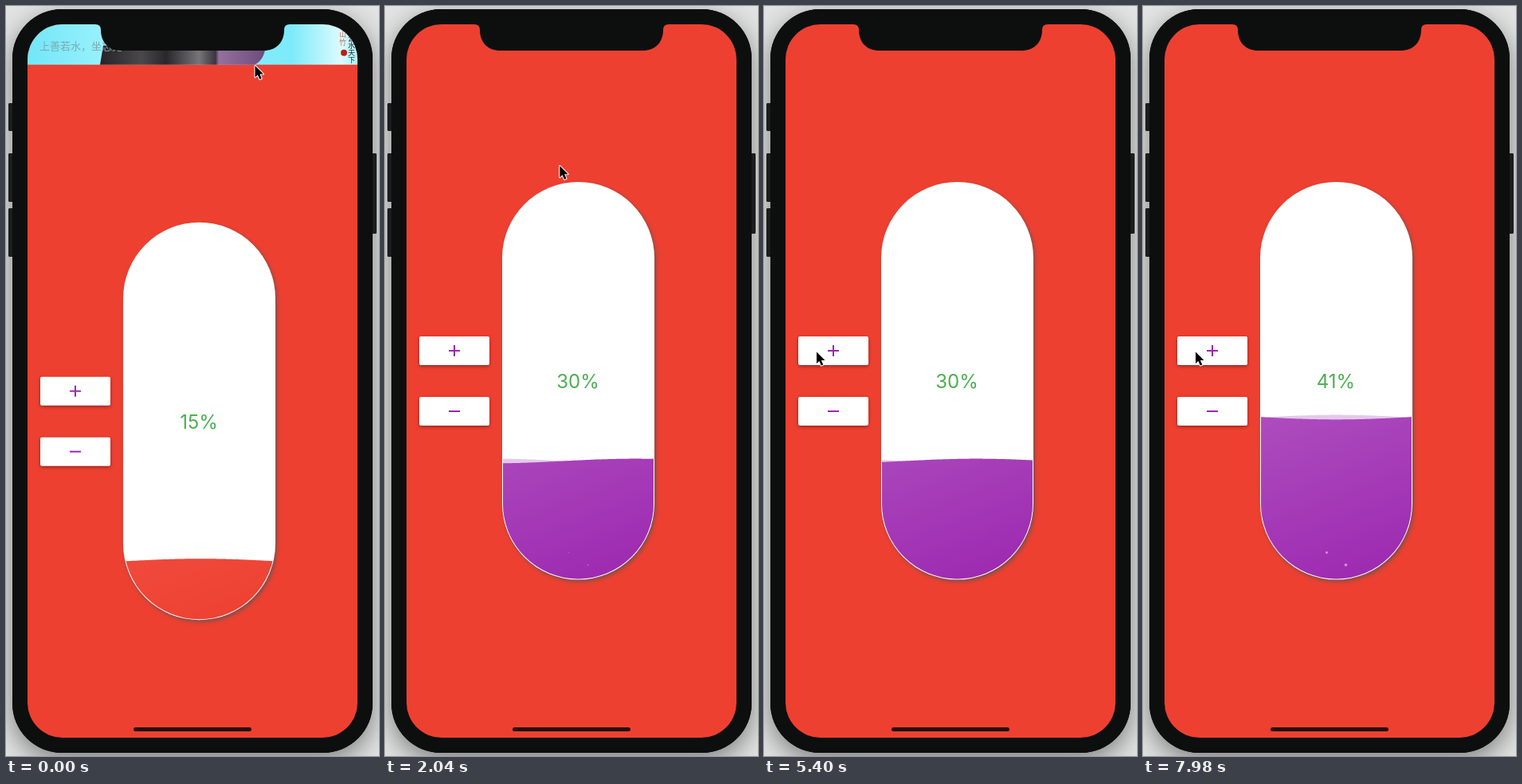
Recreate the animation shown at these times as an HTML page with a canvas. Size 468 px wide and 942 px high, loop 8000 ms.

```html
<!DOCTYPE html>
<html lang="zh">
<head>
<meta charset="utf-8">
<style>
  html, body { margin: 0; width: 100%; height: 100%; overflow: hidden; background: #dfe0e0; }
  canvas { display: block; width: 468px; height: 942px; }
</style>
</head>
<body>
<canvas id="stage" width="468" height="942"></canvas>
<script>
const ctx = document.getElementById('stage').getContext('2d');
const LOOP = 8000;
const RED = '#ee4031', PURPLE = '#9c27b0', GREEN = '#4caf50', CASE = '#0d0f0f';
const BOTTLE = { x: 147, y: 221, w: 191, h: 499.5 };

const clamp = v => Math.min(1, Math.max(0, v));
const smooth = v => v * v * (3 - 2 * v);
const easeOut = v => 1 - (1 - v) ** 3;

// Interpolates rows of [time, ...values], easing between neighbours.
function track(rows, t, ease = v => v) {
  let i = 0;
  while (i < rows.length - 2 && t >= rows[i + 1][0]) i++;
  const a = rows[i], b = rows[i + 1];
  const k = ease(clamp((t - a[0]) / (b[0] - a[0])));
  return a.slice(1).map((v, j) => v + (b[j + 1] - v) * k);
}

const CURSOR = [
  [0, 312.5, 75], [900, 297, 67], [1700, 297, 67], [2650, 32.5, 522],
  [3100, 32.5, 522], [3600, 66, 434.5], [8000, 66, 434.5]
];
const LEVEL = [
  [0, 15], [750, 30], [5400, 30], [6720, 38], [7700, 41], [8000, 41]
];

function fillRound(x, y, w, h, r, color) {
  ctx.beginPath();
  ctx.roundRect(x, y, w, h, r);
  ctx.fillStyle = color;
  ctx.fill();
}

function withShadow(color, blur, dx, dy, draw) {
  ctx.save();
  Object.assign(ctx, { shadowColor: color, shadowBlur: blur, shadowOffsetX: dx, shadowOffsetY: dy });
  draw();
  ctx.restore();
}

function dot(x, y, r, color) {
  ctx.beginPath();
  ctx.arc(x, y, Math.max(0, r), 0, Math.PI * 2);
  ctx.fillStyle = color;
  ctx.fill();
}

function drawCase() {
  ctx.fillStyle = '#e2e3e3';
  ctx.fillRect(0, 0, 468, 942);
  for (const [x, y, h] of [[3, 122, 35], [3, 185, 61], [3, 254, 61], [457, 185, 101]])
    fillRound(x, y, 8, h, 2, '#1b1e1e');
  withShadow('rgba(0,0,0,.45)', 32, 0, 10, () => fillRound(8, 4, 452, 934, 62, CASE));
  for (const [x, y, h] of [[3, 122, 35], [3, 185, 61], [3, 254, 61], [458, 185, 101]])
    fillRound(x, y, 7, h, 2, '#1b1e1e');
  fillRound(8, 4, 452, 934, 62, CASE);
}

// Banner picture whose lower edge sits at the given y.
function drawBanner(bottom) {
  ctx.save();
  ctx.translate(0, bottom - 74);
  const sky = ctx.createLinearGradient(27, 0, 441, 0);
  sky.addColorStop(0, '#72e6f8');
  sky.addColorStop(.25, '#9cf2fd');
  sky.addColorStop(.8, '#7deafa');
  sky.addColorStop(.95, '#dcfbff');
  sky.addColorStop(1, '#a8f2fb');
  ctx.fillStyle = sky;
  ctx.fillRect(27, -60, 414, 134);

  const figure = ctx.createLinearGradient(118, 0, 325, 0);
  figure.addColorStop(0, '#252326');
  figure.addColorStop(.25, '#4b484b');
  figure.addColorStop(.4, '#29272a');
  figure.addColorStop(.6, '#77747a');
  figure.addColorStop(.7, '#3a343e');
  figure.addColorStop(.72, '#95709f');
  figure.addColorStop(1, '#6d4c7c');
  ctx.fillStyle = figure;
  ctx.beginPath();
  ctx.moveTo(118, 74);
  ctx.lineTo(122, 50);
  ctx.lineTo(326, 50);
  ctx.quadraticCurveTo(324, 68, 312, 74);
  ctx.fill();

  ctx.textAlign = 'left';
  ctx.fillStyle = '#7ba9ac';
  ctx.font = '13px "Noto Sans CJK SC", "Noto Sans CJK", sans-serif';
  ctx.fillText('上善若水，坐忘无', 42, 55);
  ctx.font = '9px "Noto Sans CJK SC", "Noto Sans CJK", sans-serif';
  ctx.fillStyle = '#1d2a30';
  [...'云水天下'].forEach((c, i) => ctx.fillText(c, 429, 44 + i * 9));
  ctx.fillStyle = '#c56d62';
  [...'山竹'].forEach((c, i) => ctx.fillText(c, 418, 39 + i * 10));
  dot(424, 59, 4, '#b4201c');
  ctx.restore();
}

function drawButton(y, plus) {
  withShadow('rgba(0,0,0,.4)', 4, 0, 1.5, () => fillRound(43, y, 88, 36, 2, '#fff'));
  ctx.fillStyle = PURPLE;
  ctx.fillRect(80, y + 17, 14, 2);
  if (plus) ctx.fillRect(86, y + 11, 2, 14);
}

function waterPath(level, phase) {
  const { x, y, w, h } = BOTTLE;
  const surface = y + h + 1 - level * 5;
  ctx.beginPath();
  ctx.moveTo(x, y + h);
  for (let i = 0; i <= w; i += 2)
    ctx.lineTo(x + i, surface + 2.9 * Math.sin((phase - i) * Math.PI / 180));
  ctx.lineTo(x + w, y + h);
  ctx.closePath();
}

function drawBottle(t, level) {
  const { x, y, w, h } = BOTTLE;
  const phase = 29 + .2 * t - 22 * clamp(1 - t / 1350);
  const cycle = phase / 360 % 1;
  const color = level < 20 ? RED : PURPLE;

  withShadow('rgba(85,85,85,.75)', 5, 2, 2.5, () => fillRound(x, y, w, h, w / 2, '#fff'));

  ctx.save();
  ctx.beginPath();
  ctx.roundRect(x + 1, y + 1, w - 2, h - 2, w / 2 - 1);
  ctx.clip();

  waterPath(level, phase + 180);
  ctx.globalAlpha = .25;
  ctx.fillStyle = color;
  ctx.fill();
  ctx.globalAlpha = 1;

  waterPath(level, phase);
  ctx.fill();
  const sheen = ctx.createLinearGradient(x, y, x + w, y + h);
  const strength = color === RED ? .2 : .36;
  sheen.addColorStop(0, `rgba(255,255,255,${strength})`);
  sheen.addColorStop(1, 'rgba(255,255,255,0)');
  ctx.fillStyle = sheen;
  ctx.fill();

  if (cycle < .6) {
    dot(254.5, 702, 3.5 * cycle, 'rgba(255,255,255,.5)');
    dot(230.5, 686.5, 3.5 * (cycle - .1), 'rgba(255,255,255,.5)');
  }
  ctx.restore();

  ctx.font = '24px Inter, Roboto, sans-serif';
  ctx.textAlign = 'center';
  ctx.fillStyle = GREEN;
  ctx.fillText(Math.floor(level + .01) + '%', 242, 480);
}

function drawNotch() {
  ctx.fillStyle = CASE;
  ctx.beginPath();
  ctx.moveTo(112, 22);
  ctx.lineTo(112, 23);
  ctx.quadraticCurveTo(119, 23, 119, 30);
  ctx.bezierCurveTo(119, 46, 129, 56, 145, 56);
  ctx.lineTo(323, 56);
  ctx.bezierCurveTo(339, 56, 349, 46, 349, 30);
  ctx.quadraticCurveTo(349, 23, 356, 23);
  ctx.lineTo(356, 22);
  ctx.fill();
}

function drawCursor(x, y) {
  ctx.save();
  ctx.translate(x, y);
  ctx.beginPath();
  [[0, 0], [0, 14.5], [3.4, 11.4], [5.8, 17], [8.3, 16], [5.9, 10.5], [10.5, 10.5]]
    .forEach(p => ctx.lineTo(...p));
  ctx.closePath();
  ctx.lineWidth = 2;
  ctx.lineJoin = 'round';
  ctx.strokeStyle = '#fff';
  ctx.stroke();
  ctx.fillStyle = '#000';
  ctx.fill();
  ctx.restore();
}

function render(t) {
  const scroll = 51 * (1 - easeOut(clamp(t / 500)));
  let [level] = track(LEVEL, t);
  if (t > 5400) level = Math.floor(level + .01);

  drawCase();
  ctx.save();
  ctx.beginPath();
  ctx.roundRect(27, 23, 414, 896, 44);
  ctx.clip();
  ctx.fillStyle = RED;
  ctx.fillRect(27, 23, 414, 896);
  if (scroll > 0) drawBanner(23 + scroll);
  ctx.translate(0, scroll);
  drawButton(415, true);
  drawButton(491, false);
  drawBottle(t, level);
  ctx.restore();

  drawNotch();
  fillRound(160, 906, 148, 5, 2.5, '#250f0d');
  drawCursor(...track(CURSOR, t, smooth));
}

function tick() {
  render(performance.now() % LOOP);
  requestAnimationFrame(tick);
}
tick();
</script>
</body>
</html>
```
